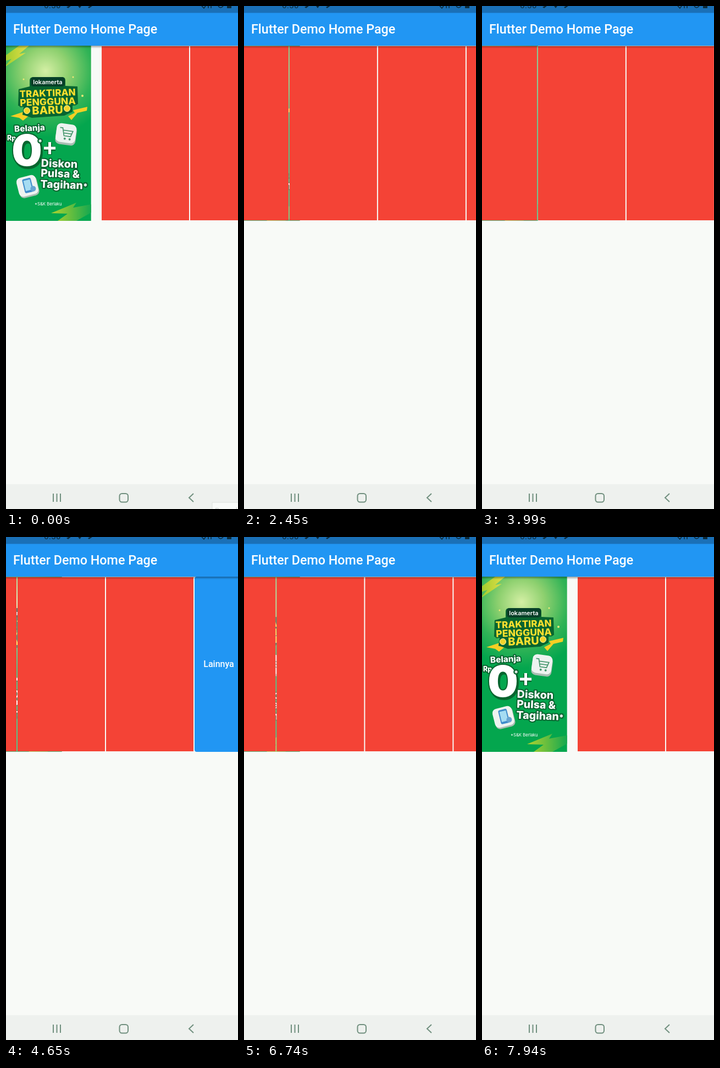
Recreate the animation shown at these times as an HTML page. Size 422 by 913 pixels, loop 8 s.

```html
<!DOCTYPE html>
<html lang="id">
<head>
<meta charset="utf-8">
<title>Flutter Demo Home Page</title>
<style>
html, body { margin: 0; width: 100%; height: 100%; overflow: hidden; background: #f8faf7; }
svg { display: block; }
.ui { font-family: Roboto, sans-serif; font-weight: 500; fill: #fff; }
.promo text { font-family: Inter, "Open Sans", sans-serif; font-weight: 800; fill: #fff; }
.promo .edge { stroke: #07652f; stroke-width: 4; stroke-linejoin: round; paint-order: stroke; }
.promo .gold { fill: #ffe02e; text-anchor: middle; }
</style>
</head>
<body>
<svg width="422" height="913" viewBox="0 0 422 913">
  <defs>
    <radialGradient id="glow" gradientUnits="userSpaceOnUse" cx="72" cy="118" r="120">
      <stop offset="0" stop-color="#d4efa4"/>
      <stop offset=".35" stop-color="#8ed06f"/>
      <stop offset=".7" stop-color="#30b356"/>
      <stop offset="1" stop-color="#04a64e"/>
    </radialGradient>
    <linearGradient id="bolt" x2="1">
      <stop offset="0" stop-color="#9ccb2c"/>
      <stop offset="1" stop-color="#e6e04a"/>
    </linearGradient>
    <linearGradient id="fade" x2="1">
      <stop offset="0" stop-color="#b4d32e"/>
      <stop offset="1" stop-color="#14a850"/>
    </linearGradient>
    <linearGradient id="shade" x2="0" y2="1">
      <stop offset="0" stop-color="#000" stop-opacity=".35"/>
      <stop offset="1" stop-color="#000" stop-opacity="0"/>
    </linearGradient>
    <clipPath id="card"><rect x="-4" y="72" width="158.7" height="318"/></clipPath>
  </defs>
  <rect width="422" height="913" fill="#f8faf7"/>

  <g id="promo" class="promo"><g clip-path="url(#card)">
    <rect x="-4" y="72" width="159" height="318" fill="url(#glow)"/>
    <path d="M-4 92L24 72H42L24 87L36 85L-4 112L10 96L-4 101Z" fill="url(#bolt)"/>
    <path d="M82 376L128 357L122 366L155 360V375L128 390H94L112 377Z" fill="url(#fade)"/>
    <path d="M8 200L32 192L30 198L42 199L31 208L24 203Z M148 183L122 189L125 194L113 200L119 207L130 194L147 190Z" fill="#f5cf24"/>
    <g fill="#f0e878"><circle cx="139" cy="163" r="2"/><circle cx="32" cy="133" r="1.5"/><circle cx="122" cy="129" r="1.5"/></g>

    <path d="M23 151L43 146V135Q43 129 50 129H102Q108 129 108 135V145L130 146L131 178L121 181V192L106 199L47 203L30 197L32 183L22 181Z" fill="#07652f"/>
    <rect x="45" y="129" width="62" height="17" rx="5" fill="#073f28"/>
    <text x="76" y="141.500" font-size="11" text-anchor="middle" style="font-weight:600">lokamerta</text>
    <g transform="rotate(-2 76 172)">
      <text class="gold edge" x="76" y="164" font-size="17">TRAKTIRAN</text>
      <text class="gold edge" x="76" y="180" font-size="17.500">PENGGUNA</text>
      <text class="gold edge" x="75" y="196" font-size="20">BARU</text>
    </g>
    <g fill="#f3d42b" stroke="#fff3a0"><circle cx="38" cy="190" r="5.500"/><circle cx="111" cy="186" r="5.500"/></g>

    <text class="edge" x="15" y="227" font-size="15.300" transform="rotate(-3 43 222)">Belanja</text>
    <text class="edge" x="2" y="244" font-size="12.500">Rp</text>
    <text class="edge" x="40" y="293" font-size="78" text-anchor="middle" style="font-weight:900;fill:#07652f">0</text>
    <text class="edge" x="38" y="290" font-size="78" text-anchor="middle" style="font-weight:900">0</text>
    <text class="edge" x="58" y="253" font-size="14">*</text>
    <path d="M69 259H90M79.500 248V270" stroke="#07652f" stroke-width="8"/>
    <path d="M69 258H90M79.500 247V269" stroke="#fff" stroke-width="5"/>
    <g transform="rotate(2 100 308)">
      <text class="edge" x="63" y="293" font-size="19.500">Diskon</text>
      <text class="edge" x="63" y="311" font-size="19.500">Pulsa &amp;</text>
      <text class="edge" x="63" y="331" font-size="19.500">Tagihan<tspan font-size="15">*</tspan></text>
    </g>

    <g transform="rotate(8 109 232)">
      <rect x="91" y="217" width="37" height="35" rx="8" fill="#a9bdb2"/>
      <rect x="91" y="214" width="36" height="34" rx="8" fill="#eef3f0"/>
      <path d="M97 222H102L106 236H118L121 226H104M105 231H119" fill="none" stroke="#4a9970" stroke-width="1.800"/>
      <circle cx="108" cy="241" r="2" fill="#4a9970"/><circle cx="117" cy="241" r="2" fill="#4a9970"/>
    </g>
    <g transform="rotate(-14 39 327)">
      <rect x="22" y="311" width="36" height="36" rx="8" fill="#a9bdb2"/>
      <rect x="21" y="309" width="36" height="35" rx="8" fill="#eef3f0"/>
      <rect x="32" y="313" width="16" height="26" rx="3" fill="#3f8ccb"/>
      <rect x="34" y="316" width="12" height="19" fill="#a5dcf2"/>
      <circle cx="48" cy="334" r="5" fill="#66a4d2"/>
    </g>
    <text x="52" y="362" font-size="7.700" style="font-weight:400">*S&amp;K Berlaku</text>
  </g></g>

  <g id="list">
    <g id="tiles" fill="#f44336"></g>
    <rect x="818" y="72" width="88" height="318" rx="4" fill="#2196f3"/>
    <text class="ui" x="862" y="236" font-size="16" text-anchor="middle">Lainnya</text>
  </g>

  <rect y="72" width="422" height="5" fill="url(#shade)"/>
  <rect y="12" width="422" height="60" fill="#2196f3"/>
  <rect width="422" height="12.500" fill="#1a70b7"/>
  <text class="ui" x="13" y="49.500" font-size="23.300">Flutter Demo Home Page</text>
  <g fill="#0c2c3d">
    <text x="69" y="4" font-size="15" font-family="Roboto, sans-serif" letter-spacing=".5">6:50</text>
    <path d="M110 2L114 0H118L113 4Z M131 0H137L134 4Z M149 2L153 0H157L151 4Z M402 0H410V4H402Z"/>
    <path d="M356 0L360 4L363 0M368 0V4M373 0V4M386 0Q390 6 395 0" fill="none" stroke="#0c2c3d" stroke-width="1.500"/>
  </g>

  <rect y="868" width="422" height="45" fill="#eef1ee"/>
  <g fill="none" stroke="#71907f" stroke-width="2">
    <path d="M86 885V900M92.500 885V900M99 885V900M341 885L333 892.500L341 900"/>
    <rect x="206.500" y="885" width="15.500" height="15.500" rx="4.500"/>
  </g>
  <g id="tip">
    <rect x="375" y="901" width="50" height="20" fill="#f9fbf9" stroke="#dde1de"/>
    <text id="hint" x="380" y="920" font-size="13" font-family="Roboto, sans-serif" fill="#d3d8d5">Record</text>
  </g>
</svg>
<script>
const $ = id => document.getElementById(id);
const LOOP = 8000;

// [time in ms, scroll offset in px]
const drag = [
  [0, 0], [1560, 0], [2300, 228], [2450, 252], [3450, 352], [3990, 394], [4590, 475],
  [5600, 475], [6060, 395], [6740, 276], [7270, 76], [7700, 0], [LOOP, 0]
];

for (let i = 0; i < 4; i++)
  $('tiles').innerHTML += `<rect x="${174 + 161 * i}" y="73" width="159" height="316"/>`;

function scrollAt(t) {
  const i = drag.findIndex(([end]) => t < end);
  const [t0, a] = drag[i - 1], [t1, b] = drag[i];
  return a + (b - a) * (t - t0) / (t1 - t0);
}

function draw(now) {
  const t = now % LOOP;
  const offset = scrollAt(t);
  const hidden = Math.min(1, offset / 159);
  $('list').setAttribute('transform', `translate(${-offset} 0)`);
  $('promo').setAttribute('transform', `translate(${-53 * hidden} 0)`);
  $('promo').setAttribute('opacity', 1 - 0.35 * hidden);
  $('tip').style.display = t < 1580 ? '' : 'none';
  $('hint').style.display = t < 70 ? '' : 'none';
  requestAnimationFrame(draw);
}
requestAnimationFrame(draw);
</script>
</body>
</html>
```
